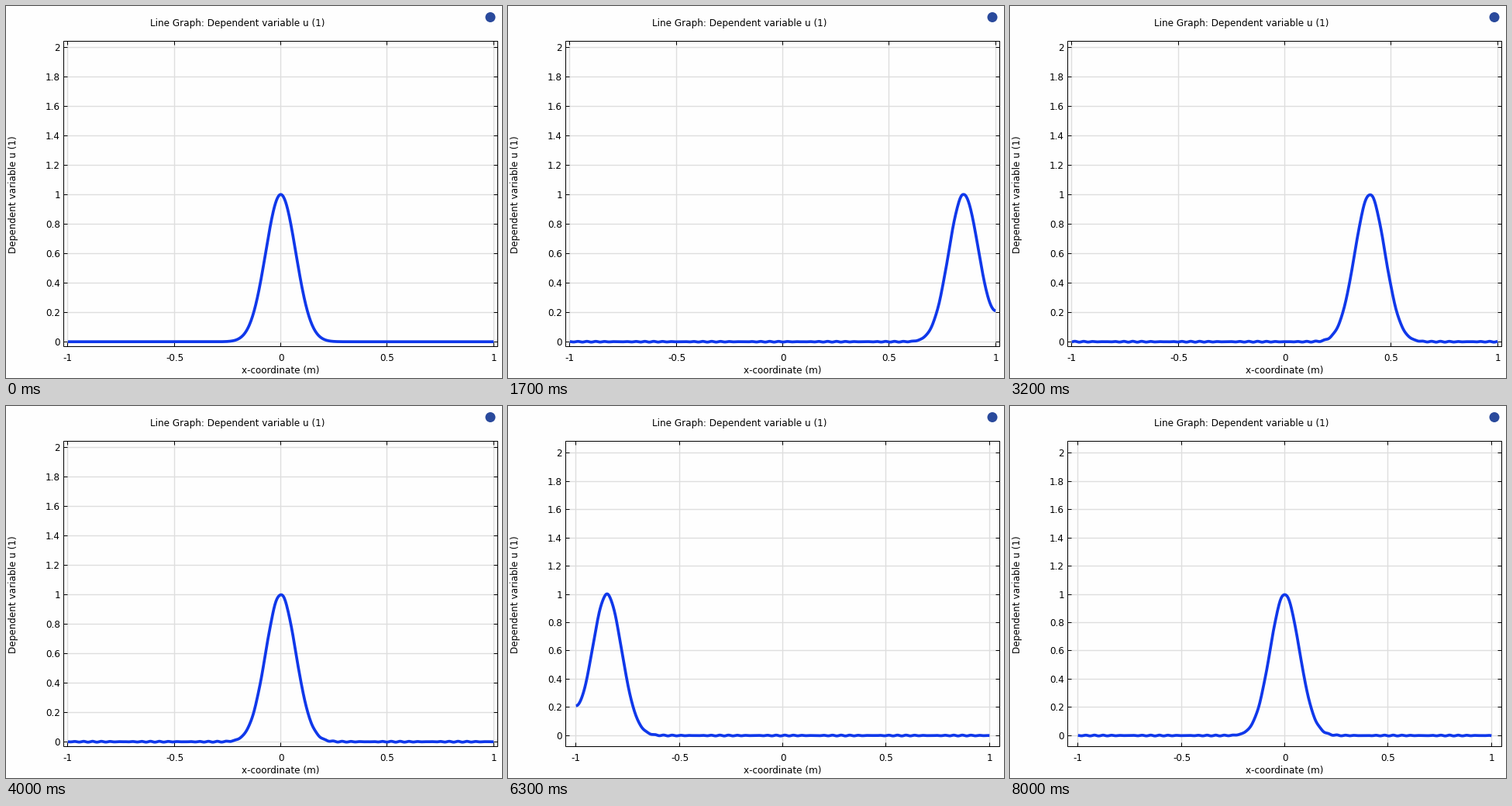
Animation, 640 px wide and 480 px high, one loop 8100 ms. Source, as a matplotlib script:

```python
import numpy as np
import matplotlib.pyplot as plt
from matplotlib.animation import FuncAnimation
from matplotlib.patches import Circle, Rectangle

FRAMES, INTERVAL = 81, 100
RESCALE_FRAME = 43          # the axis limits widen here
PX = 0.72                   # points per pixel at 100 dpi
LEFT, RIGHT, TOP, BOTTOM = 74.5, 634.5, 45.5, 439.5
TICK = 5
BLUE = "#1038ea"

plt.rcParams["font.family"] = "DejaVu Sans"
fig = plt.figure(figsize=(6.4, 4.8), dpi=100, facecolor="#fefefe")
ax = fig.add_axes([0, 0, 1, 1])
ax.set(xlim=(0, 640), ylim=(480, 0))
ax.axis("off")


def text(x, y, label, ha="center", **kw):
    return ax.text(x, y, label, fontsize=12 * PX, ha=ha, va="baseline",
                   color="black", **kw)


def segment(xs, ys, color="black", width=1.0, z=2):
    return ax.plot(xs, ys, color=color, lw=width * PX, zorder=z,
                   solid_capstyle="butt", snap=False)[0]


class Scale:
    """Maps data to pixels and owns the matching grid, ticks and labels."""

    def __init__(self, x_unit, y_zero, y_unit):
        self.x_unit, self.y_zero, self.y_unit = x_unit, y_zero, y_unit
        self.artists = []
        for value in np.linspace(-1, 1, 5):
            self.add_x_tick(value)
        for value in np.linspace(0, 2, 11):
            self.add_y_tick(value)

    def px(self, x):
        return 354.5 + self.x_unit * x

    def py(self, y):
        return self.y_zero - self.y_unit * y

    def add_x_tick(self, value):
        x = np.floor(self.px(value)) + 0.5
        self.artists += [
            segment([x, x], [TOP, BOTTOM], "#dedede", 1.4, 1),
            segment([x, x], [TOP, TOP + TICK]),
            segment([x, x], [BOTTOM - TICK, BOTTOM]),
            text(x, 458, f"{value:g}"),
        ]

    def add_y_tick(self, value):
        y = np.floor(self.py(value)) + 0.5
        self.artists += [
            segment([LEFT, RIGHT], [y, y], "#dedede", 1.4, 1),
            segment([LEFT, LEFT + TICK], [y, y]),
            segment([RIGHT - TICK, RIGHT], [y, y]),
            text(70, y + 4.5, f"{value:.2g}", ha="right"),
        ]

    def show(self, visible):
        for artist in self.artists:
            artist.set_visible(visible)


tight = Scale(274.7, 433.2, 190.0)
loose = Scale(266.8, 425.2, 182.2)

ax.add_patch(Rectangle((LEFT, TOP), RIGHT - LEFT, BOTTOM - TOP, fill=False,
                       ec="black", lw=PX, zorder=3, snap=False))
text(299, 26, "Line Graph: Dependent variable u (1)")
text(354.5, 474, "x-coordinate (m)")
text(13.5, 243.5, "Dependent variable u (1)", rotation=90,
     rotation_mode="anchor")
ax.add_patch(Circle((625, 14.5), 6.5, color="#2a4a9c", lw=0))

curve = segment([], [], BLUE, 3.7, 4)
x = np.linspace(-1, 1, 801)


def wave(t):
    """Gaussian pulse moving right at unit speed, reflected at both walls."""
    u = sum(np.exp(-((x - c) / 0.1) ** 2)
            for k in (-4, 0, 4) for c in (t + k, 2 - t + k))
    if t < 2e-9:
        u = np.exp(-(x / 0.1) ** 2)
    # faint numerical ripple left behind the pulse
    ripple = 0.003 * min(1, t) * np.sin(150 * x + 9 * t) * np.cos(11 * x - 3 * t)
    return u + ripple * (x < max(t, 0.01))


def update(frame):
    scale = tight if frame < RESCALE_FRAME else loose
    tight.show(scale is tight)
    loose.show(scale is loose)
    curve.set_data(scale.px(x), scale.py(wave(frame * 0.05)))
    return [curve]


anim = FuncAnimation(fig, update, frames=FRAMES, interval=INTERVAL,
                     repeat=True, repeat_delay=0, blit=False)
plt.show()
```
